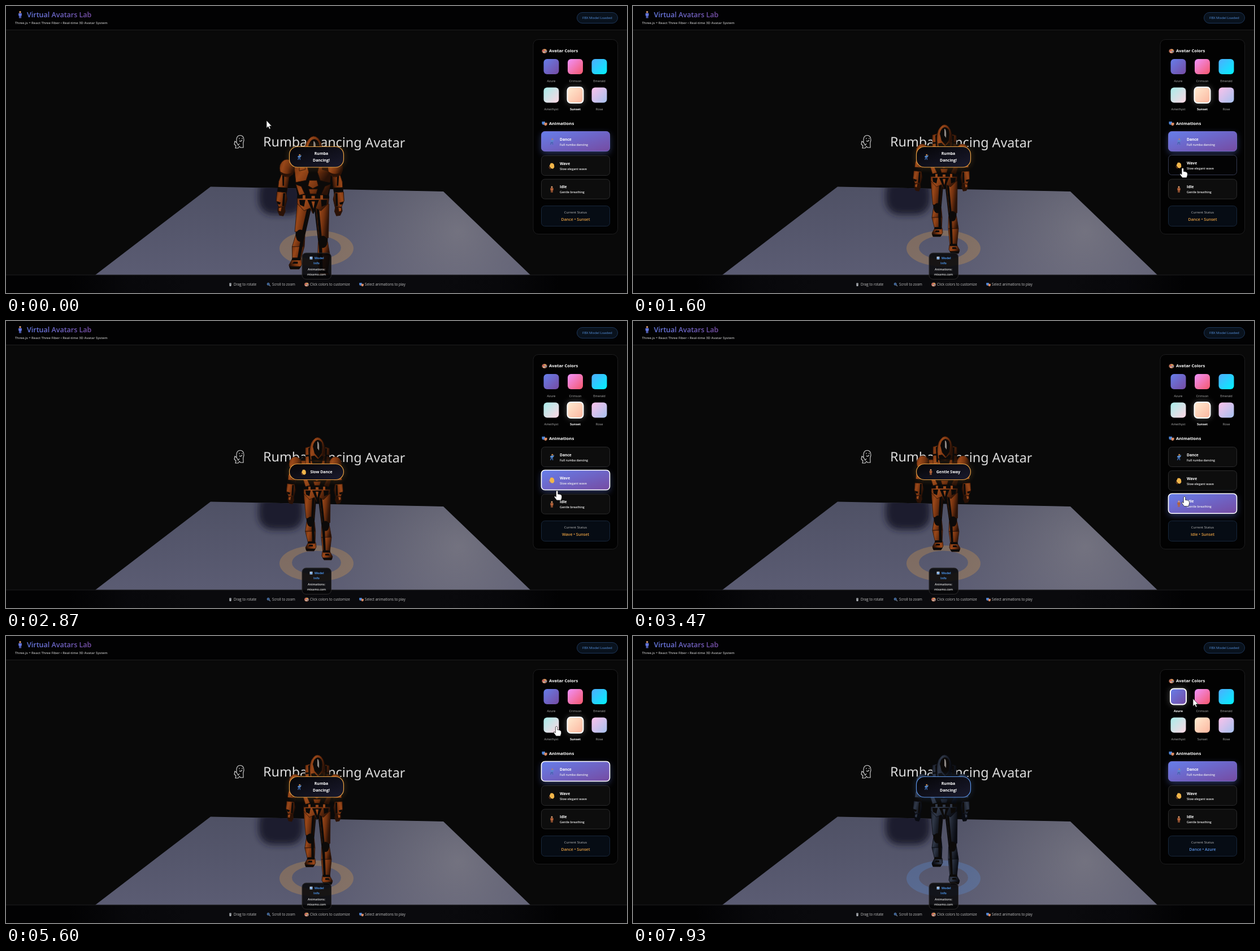
Recreate the animation shown at these times as an HTML page. Size 1099 by 509 pixels, loop 8000 ms.

```html
<!DOCTYPE html>
<html lang="en">
<head>
<meta charset="utf-8">
<title>Virtual Avatars Lab</title>
<style>
  html, body { margin: 0; width: 100%; height: 100%; overflow: hidden; background: #090909; }
  svg { display: block; width: 1099px; height: 509px; font-family: "Open Sans", "Noto Sans", sans-serif; }
  .bold { font-weight: 700; }
  .semi { font-weight: 600; }
  .mid { text-anchor: middle; }
  .accent { fill: var(--accent); }
  .lite { fill: var(--lite); }
  .dark { fill: var(--dark); }
  .black { fill: #0c0a09; }
  .plate { fill: url(#armour); stroke: var(--dark); stroke-width: .8; stroke-linejoin: round; }
</style>
</head>
<body>
<script>
const LOOP = 8000;

const themes = {
  Azure:    { accent: '#5a93e6', main: '#1b202b', lite: '#303848', dark: '#090b11' },
  Amethyst: { accent: '#a34fc4', main: '#4a0e34', lite: '#741d56', dark: '#1b0614' },
  Sunset:   { accent: '#e9a143', main: '#72310f', lite: '#984719', dark: '#2a1207' }
};

const swatches = [
  ['Azure', '#667eea', '#764ba2'], ['Crimson', '#f093fb', '#f5576c'], ['Emerald', '#4facfe', '#00f2fe'],
  ['Amethyst', '#a8edea', '#fed6e3'], ['Sunset', '#ffecd2', '#fcb69f'], ['Rose', '#fbc2eb', '#a6c1ee']
].map(([name, from, to], i) => ({ name, from, to, x: [965, 1007.5, 1050][i % 3], y: i < 3 ? 107.5 : 158 }));

const buttons = [
  { name: 'Dance', note: 'Full rumba dancing', icon: 'dancer', y: 223, badge: ['Rumba', 'Dancing!'] },
  { name: 'Wave', note: 'Slow elegant wave', icon: 'hand', y: 265, badge: ['Slow Dance'] },
  { name: 'Idle', note: 'Gentle breathing', icon: 'person', y: 306.7, badge: ['Gentle Sway'] }
];

// Timeline of clicks
const moves = [
  { at: 0, button: 0, speed: 1, phase: 1870, focus: false },
  { at: 1950, button: 1, speed: 0.8, phase: 0, focus: true },
  { at: 3150, button: 2, speed: 0.05, phase: 0, focus: true },
  { at: 4420, button: 0, speed: 1, phase: 20, focus: true }
];
const colors = [{ at: 0, name: 'Sunset' }, { at: 6400, name: 'Amethyst' }, { at: 7350, name: 'Azure' }];

// time, x, y
const pointer = [
  [0, 461, 203], [80, 461, 203], [450, 800, 262], [750, 960, 286], [930, 967, 289], [1700, 973, 287],
  [2650, 974, 286], [3050, 976, 311], [3550, 976, 311], [4200, 1000, 233], [4700, 1000, 232],
  [5150, 986, 180], [5700, 973, 158], [6200, 966, 153], [6930, 966, 153], [7250, 967, 107],
  [7650, 970, 107], [7930, 991, 111], [8000, 993, 111]
];

// phase, head top, scale, centre x, left foot x y, right foot x y
const DANCE = 2370;
const steps = [
  [0, 204, 1, 551, 541, 403, 568, 406],
  [430, 203, 1, 550, 541, 403, 566, 418],
  [800, 206, 1, 550, 541, 405, 567, 421],
  [1160, 210, 1, 550, 540, 406, 567, 437],
  [1650, 222, 1.1, 547, 530, 432, 565, 459],
  [1870, 230, 1.2, 543, 514, 463, 562, 486],
  [2000, 226, 1.13, 546, 522, 448, 565, 478],
  [2200, 207, 1, 550, 540, 404, 567, 427],
  [DANCE, 204, 1, 551, 541, 403, 568, 406]
];

const lerp = (a, b, k) => a + (b - a) * k;
const mix = (p, q, k) => p.map((v, i) => lerp(v, q[i], k));

function sample(rows, t) {
  const i = Math.max(1, rows.findIndex(row => row[0] >= t));
  const [a, b] = [rows[i - 1], rows[i]];
  const k = (t - a[0]) / (b[0] - a[0]);
  return mix(a, b, k * k * (3 - 2 * k)).slice(1);
}

const text = (x, y, size, fill, str, cls = '', extra = '') =>
  `<text x="${x}" y="${y}" font-size="${size}" fill="${fill}" class="${cls}" ${extra}>${str}</text>`;
const box = (x, y, w, h, r, fill, stroke, extra = '') =>
  `<rect x="${x}" y="${y}" width="${w}" height="${h}" rx="${r}" fill="${fill}" stroke="${stroke}" ${extra}/>`;
const gradient = (id, stops, coords = 'x2="1" y2="1"') =>
  `<linearGradient id="${id}" ${coords}>${stops.map((c, i) =>
    `<stop offset="${i / (stops.length - 1)}" style="stop-color:${c}"/>`).join('')}</linearGradient>`;
const blur = (id, amount) =>
  `<filter id="${id}" x="-60%" y="-60%" width="220%" height="220%"><feGaussianBlur stdDeviation="${amount}"/></filter>`;

// Small icons centred on 0,0
const icons = {
  person: (c = '#b5633a') => `<circle cy="-4.3" r="1.5" fill="#e0a070"/>
    <path d="M-2.6-2.4H2.6V1.5H1.7V5.5H.3V2H-.3V5.5H-1.7V1.5H-2.6Z" fill="${c}"/>`,
  dancer: () => `<circle cx=".8" cy="-4.3" r="1.5" fill="#c98b4f"/>
    <path d="M-2-2.4 2.5-2.8 4-4.6 3.6-1.2 1.8.4-1.6.6-3.5-.2Z" fill="#5b8fd0"/>
    <path d="M-1.6.4H1.8L2.4 5.5H1L.2 2-2 5.5H-3.2Z" fill="#3a64a4"/>`,
  hand: () => `<path d="M-4.4.2-2-4.8-.6-5 .2-4.4 1.6-5 2.6-3.6 3.6-3 4-1.4 4.4 2.6 2 5.2-1.6 4.6Z" fill="#f2b54a"/>
    <path d="M-5 1.5-4 4.4-2 5.6" fill="none" stroke="#c05a2e" stroke-width=".8"/>`,
  palette: () => `<ellipse rx="4.6" ry="4" fill="#b9785c"/><circle cx="-2" cy="-1" r="1.1" fill="#e2445c"/>
    <circle cx="1" cy="-2" r="1.1" fill="#f3c44c"/><circle cx="2.4" cy=".6" r="1.1" fill="#59a5e8"/>
    <circle cx="-1" cy="1.8" r="1" fill="#f4eee8"/>`,
  masks: () => `<path d="M-4.5-3.5H1V.5Q-2 4-4.5.5Z" fill="#4d86d8"/><path d="M-.5-1.5H4.6V2Q2 5.5-.5 2.2Z" fill="#d88a63"/>`,
  mouse: () => `<rect x="-2" y="-3.5" width="4" height="7" rx="1.4" fill="#a9adb3"/><path d="M0-3.5V-.5" stroke="#333" stroke-width=".7"/>`,
  lens: () => `<circle cx="-1" cy="-1" r="2.3" fill="#274a78" stroke="#6e9bd8"/><path d="M.8.8 3.4 3.4" stroke="#8b9bb0" stroke-width="1.3"/>`,
  chart: () => `<rect x="-3" y="-3" width="6" height="6" fill="#dfe5ec"/>
    <path d="M-2 2.6V0M0 2.6V-2.4M2 2.6V-1" stroke="#4a90e2" stroke-width="1.3"/>`
};
const icon = (name, x, y, k = 1, color) =>
  `<g transform="translate(${x} ${y}) scale(${k})">${icons[name](color)}</g>`;

const floor = 'M362 320.5 774 329 928 477H158Z';

const scene = `
  <rect width="1099" height="509" fill="#090909"/>
  <g transform="rotate(.45 455 249)">${text(455, 249, 23.3, '#dcdcdc', 'Rumba Dancing Avatar', '', 'style="font-family:\'Noto Sans\',sans-serif"')}</g>
  <path d="M408 236Q409 229 415 229.500 421 230 421 238 419 243 420 248L420 251H415L413 249 411 252H406L407 248 404 245 405 240 408 242ZM412 235H414M417 235H419M413 239Q415 241 418 238M408 242 411 247 413 244"
    fill="none" stroke="#d8d8d8" stroke-width="1.100"/>
  <path d="${floor}" fill="url(#floorTone)"/>
  <g clip-path="url(#onFloor)">
    <path d="${floor}" fill="url(#floorLight)"/>
    <rect x="447" y="305" width="79" height="65" rx="25" fill="#1a1a2e" filter="url(#blur6)"/>
    <path class="accent" opacity=".27" fill-rule="evenodd"
      d="M484 430a65.500 32 0 1 0 131 0a65.500 32 0 1 0-131 0ZM506 428.500a43.500 21 0 1 0 87 0a43.500 21 0 1 0-87 0Z"/>
  </g>`;

const arm = `
  <path class="plate" d="M-45 54-34 55-36 72-38 84-51 82-50 68Z"/>
  <path class="black" d="M-51 76-37 77-38 87-52 86ZM-45 56-42 56-42 74-44 74Z"/>
  <path class="plate" d="M-52 83-39 84-37 94-40 106-49 106-53 96Z"/>
  <path class="black" d="M-43 85-40 85-41 104-44 104ZM-52 97-46 99-48 102-51 101Z"/>
  <path class="dark" d="M-50 105H-40L-39 112-42 119-48 118-51 111Z"/>
  <path class="lite" d="M-49 107-45 106-46 112-49 111Z"/>`;

const bodyArt = `
  <g id="armL">${arm}</g>
  <g id="armR"><g transform="translate(-6) scale(-1 1)">${arm}</g></g>
  <path class="black" d="M-29 38-17 34H18L30 38 27 70 22 98H-21L-26 70Z"/>
  <path class="plate" d="M-28 42-9 42-6 54-10 66-25 69ZM10 42 28 42 25 69 11 66 7 54Z"/>
  <path class="plate" d="M-25 72-17 75-12 86-20 88ZM26 72 18 75 13 86 21 88ZM-5 66H6L8 74 0 78-7 74ZM-6 79H7L5 86H-4Z"/>
  <ellipse class="plate" cx="-38" cy="48" rx="11" ry="13"/><ellipse class="plate" cx="33" cy="48" rx="11" ry="13"/>
  <path class="dark" d="M-48 53Q-38 60-28 53L-29 57Q-38 64-47 57ZM23 53Q33 60 43 53L42 57Q33 64 24 57Z"/>
  <path class="plate" d="M-20 19-12 17-11 50-20 52ZM15 18 22 20 22 52 14 50Z"/>
  <path class="black" d="M-15 20-12 18-11 46-14 46ZM15 20 18 20 17 46 14 46ZM-20 32-12 31-12 34-20 35ZM15 31 22 32 22 35 15 34Z"/>
  <path class="plate" d="M-23 90H24L23 100 12 111 4 107 0 115-4 107-13 111-23 100Z"/>
  <path class="black" d="M-23 88H24V93H-23ZM-8 95H9L1 116ZM-20 95-11 95-13 105-19 102ZM12 95H21L20 102 13 105Z"/>
  <path class="lite" d="M-15 88H-11V94H-15ZM11 88H15V94H11ZM-2 89H3V93H-2ZM-2 97H3L1 108Z"/>
  <path class="plate" d="M-11 40Q-15 14-6 5 1-3 8 4 17 13 13 40Q2 46-11 40Z"/>
  <path class="black" d="M-7 17Q-5 6 2 5 10 6 10 18L9 28 3 37-4 29ZM-10 34-4 33 2 39 9 33 12 35 10 42H-9Z"/>
  <path d="M1 8Q5 8 4 24L1 20Z" fill="#8d8783"/>`;

const swatchArt = s => `
  <g id="sw${s.name}"></g>
  ${text(s.x, s.y + (s.y < 150 ? 27.5 : 27), 5.6, '#b4b4b4', s.name, 'mid', `id="label${s.name}"`)}`;

const hints = [['mouse', 397, 403, 'Drag to rotate'], ['lens', 465, 471, 'Scroll to zoom'],
  ['palette', 532, 538, 'Click colors to customize'], ['masks', 629, 635, 'Select animations to play']];

const ui = `
  <rect width="1099" height="42" fill="#020203"/><rect y="42" width="1099" height="1" fill="#1e1e1f"/>
  ${icon('person', 25, 15.5, 1.1, '#6476de')}
  ${text(37, 20, 12.5, 'url(#titleTone)', 'Virtual Avatars Lab', 'semi')}
  ${text(16, 32, 5.95, '#b8b8b8', 'Three.js + React Three Fiber • Real-time 3D Avatar System', 'semi')}
  ${box(1010.5, 11.500, 72, 19, 9.500, '#09121d', '#1c3558')}
  ${text(1020, 23.3, 6.1, '#5592e0', 'FBX Model Loaded')}
  <rect y="477" width="1099" height="32" fill="#020203"/>
  <rect x="110" y="477" width="870" height="32" fill="url(#footerTone)"/>
  <rect y="476.500" width="1099" height="1" fill="#1e1e20"/>
  ${hints.map(([name, x, tx, str]) => icon(name, x, 494, .85) + text(tx, 496.2, 6.2, '#c2c2c2', str)).join('')}
  ${box(524, 438, 51.500, 46.500, 7, '#060607', '#2c2a2b', 'fill-opacity=".86"')}
  ${icon('chart', 540, 447, .8)}
  ${text(546, 449, 5.4, '#4a90e2', 'Model', 'bold')}
  ${text(549.5, 457.7, 5.4, '#4a90e2', 'Info', 'bold mid')}
  ${text(549.5, 469, 5.4, '#e0e0e0', 'Animations:', 'mid semi')}
  ${text(549.5, 477.700, 5.3, '#e0e0e0', 'mixamo.com', 'mid semi')}
  <g id="badge"></g>
  ${box(933, 59.500, 149.500, 345, 9, '#020202', '#1d1d1e')}
  ${icon('palette', 953, 80)}${text(961, 82.3, 7.600, '#fff', 'Avatar Colors', 'bold')}
  ${swatches.map(swatchArt).join('')}
  ${icon('masks', 953, 208.500)}${text(961, 211.2, 7.700, '#fff', 'Animations', 'bold')}
  <g id="buttons"></g>
  ${box(947.5, 354.500, 121, 36, 6, '#060c14', '#17273b')}
  ${text(1008, 368.2, 6, '#bcbcbc', 'Current Status', 'mid')}
  <text id="status" x="1008" y="380.500" font-size="7.100" class="semi mid accent"></text>`;

document.body.innerHTML = `<svg viewBox="0 0 1099 509" id="stage">
  <defs>
    ${swatches.map(s => gradient('tone' + s.name, [s.from, s.to])).join('')}
    ${gradient('active', ['#667eea', '#764ba2'])}
    ${gradient('titleTone', ['#667eea', '#764ba2'], 'gradientUnits="userSpaceOnUse" x1="30" x2="155"')}
    ${gradient('badgeTone', ['#050506', '#1a1a2e'])}
    ${gradient('footerTone', ['#020203', '#08080b', '#0a0a0d', '#0a0a0d', '#0a0a0d', '#0a0a0d', '#0a0a0d', '#08080b', '#020203'], '')}
    ${gradient('floorTone', ['#4f5165', '#5b5c73'], 'x2="0" y2="1"')}
    ${gradient('armour', ['var(--main)', 'var(--lite)', 'var(--main)', 'var(--dark)'], 'x2="1" y2=".35"')}
    <radialGradient id="floorLight" gradientUnits="userSpaceOnUse" cx="800" cy="400" r="260">
      <stop stop-color="#83818a" stop-opacity=".65"/><stop offset="1" stop-color="#777581" stop-opacity="0"/></radialGradient>
    <clipPath id="onFloor"><path d="${floor}"/></clipPath>
    ${blur('blur4', 4)}${blur('blur6', 6)}
  </defs>
  ${scene}
  <g id="legs"></g><g id="body">${bodyArt}</g>
  ${ui}
  <path id="cursor" stroke="#111" stroke-width=".7" fill="#fff"/>
</svg>`;

const $ = id => document.getElementById(id);
const ARROW = 'M0 0V13.500L3 10.700 5.200 15.300 7.200 14.300 5.200 10H9.300Z';
const HAND = 'M-1.700 1.500Q0-1 1.700 1.500V6.500Q8 6.500 8.500 10V13L7 17.500H-.5L-4.700 12Q-5.200 9.300-3 10.300L-1.700 11.800Z';

// Tapered bar between two points, with a half width at each end
const limb = (cls, ax, ay, aw, bx, by, bw) =>
  `<path class="${cls}" d="M${ax - aw} ${ay}L${ax + aw} ${ay} ${bx + bw} ${by} ${bx - bw} ${by}Z"/>`;

function leg(hipX, hipY, footX, footY, s, side) {
  const kneeX = (hipX + footX) / 2 + side * s, kneeY = lerp(hipY, footY, .48);
  const calfX = lerp(kneeX, footX, .35) + side * s, calfY = lerp(kneeY, footY, .35), ankle = footY - 10 * s;
  return limb('black', hipX, hipY - 8 * s, 11 * s, kneeX, kneeY, 7 * s) +
    limb('plate', hipX + side * 2 * s, hipY - 4 * s, 10 * s, kneeX + side * s, kneeY - 6 * s, 7 * s) +
    limb('black', hipX - side * 5 * s, hipY, 2 * s, kneeX - side * 3 * s, kneeY, 2 * s) +
    limb('plate', kneeX, kneeY, 7 * s, calfX, calfY, 9 * s) +
    limb('plate', calfX, calfY, 9 * s, footX, ankle, 6 * s) +
    limb('black', kneeX - side * 4 * s, kneeY, 2.500 * s, footX - side * 3 * s, ankle, 2 * s) +
    `<ellipse class="black" cx="${kneeX}" cy="${kneeY}" rx="${6.500 * s}" ry="${9 * s}"/>` +
    `<g transform="translate(${footX} ${footY}) scale(${s * side} ${s})">
      <path class="plate" d="M-7-12H6L11-3 9 3H-4L-8-4Z"/><path class="black" d="M-7-1 11-1 9 3H-4ZM-6-14H6L7-10H-6ZM-2-8 4-8 6-5H-2Z"/></g>`;
}

function drawAvatar(t, index) {
  const poseOf = m => sample(steps, (m.phase + (t - m.at) * m.speed) % DANCE);
  let pose = poseOf(moves[index]);
  const fade = (t - moves[index].at) / 300;
  if (index && fade < 1) pose = mix(poseOf(moves[index - 1]), pose, fade);
  const [top, s, x, lx, ly, rx, ry] = pose;
  const hipY = top + 105 * s;
  $('legs').innerHTML = leg(x - 11 * s, hipY, lx, ly, s, -1) + leg(x + 12 * s, hipY, rx, ry, s, 1);
  $('body').setAttribute('transform', `translate(${x} ${top}) scale(${s})`);
  const swing = (ry - ly - 3) * .06;
  $('armL').setAttribute('transform', `rotate(${swing} -40 50)`);
  $('armR').setAttribute('transform', `rotate(${swing} 36 50)`);
}

function drawButtons(t, index, focused, x, y) {
  const { at, button } = moves[index];
  const fade = Math.min(1, (t - at) / 220);
  const previous = index ? moves[index - 1].button : -1;
  $('buttons').innerHTML = buttons.map((b, i) => {
    const active = i === button;
    const hover = x > 947 && x < 1068 && y > b.y && y < b.y + 36;
    const glow = active ? 1 : i === previous ? 1 - fade : 0;
    const raised = glow > 0 || hover;
    const top = b.y + .5 - (raised ? 1 : 0);
    const stroke = active ? (focused ? '#fff' : '#6f69c4') : raised ? '#343950' : '#2a2a2b';
    return box(947.5, top + 4, 121, 35, 6, '#667eea', 'none', `opacity="${glow * .4}" filter="url(#blur6)"`) +
      box(947.5, top, 121, 35, 6, active ? 'url(#active)' : raised ? '#030304' : '#0d0d0d', stroke,
        `stroke-width="${active && focused ? 1.6 : 1}"`) +
      `<g opacity="${active && b.icon === 'dancer' ? .65 : 1}">${icon(b.icon, 966, top + 18)}</g>` +
      text(980, top + 16, 6.700, '#fff', b.name, 'bold') + text(980, top + 25, 5.400, '#f0f0f0', b.note, 'semi');
  }).join('');
}

function drawBadge(button) {
  const { badge, icon: name } = buttons[button];
  const tall = badge.length > 1;
  const [y, h] = tall ? [249.500, 36.500] : [253.500, 28];
  const frame = 'stroke="var(--accent)"';
  $('badge').innerHTML =
    `<rect x="501.500" y="${y}" width="96" height="${h}" rx="14" fill="none" ${frame} stroke-width="4" opacity=".25" filter="url(#blur4)"/>` +
    `<rect x="501.500" y="${y}" width="96" height="${h}" rx="14" fill="url(#badgeTone)" ${frame} stroke-width="1.200"/>` +
    icon(name, tall ? 519 : 527, 268, .9) +
    badge.map((line, i) => text(558, (tall ? 264.300 : 270) + i * 11.200, 6.900, '#fff', line, 'bold mid')).join('');
}

function drawSwatches(selected) {
  for (const s of swatches) {
    const on = s.name === selected, r = on ? 14 : 13.500;
    const shape = (fill, stroke, extra) => box(s.x - r, s.y - r, 2 * r, 2 * r, 6, fill, stroke, extra);
    $('sw' + s.name).innerHTML = (on ? shape('#fff', 'none', 'opacity=".35" filter="url(#blur6)"') : '') +
      shape(`url(#tone${s.name})`, on ? '#fff' : 'none', 'stroke-width="2"');
    $('label' + s.name).setAttribute('class', on ? 'mid bold' : 'mid');
    $('label' + s.name).setAttribute('fill', on ? '#fff' : '#b4b4b4');
  }
}

function draw(t) {
  const index = moves.findLastIndex(m => m.at <= t);
  const color = colors.findLast(c => c.at <= t);
  const { button, focus } = moves[index];
  const [x, y] = sample(pointer, t);

  for (const [key, value] of Object.entries(themes[color.name])) $('stage').style.setProperty('--' + key, value);
  drawAvatar(t, index);
  drawBadge(button);
  drawSwatches(color.name);
  drawButtons(t, index, focus && color.at === 0, x, y);
  $('status').textContent = `${buttons[button].name} • ${color.name}`;

  const overButton = x > 947 && x < 1068 && buttons.some(b => y > b.y && y < b.y + 36);
  const overSwatch = swatches.some(s => Math.abs(x - s.x) < 15 && Math.abs(y - s.y) < 15);
  $('cursor').setAttribute('d', overButton || overSwatch ? HAND : ARROW);
  $('cursor').setAttribute('transform', `translate(${x} ${y})`);
}

function tick() {
  draw(performance.now() % LOOP);
  requestAnimationFrame(tick);
}
tick();
</script>
</body>
</html>
```
